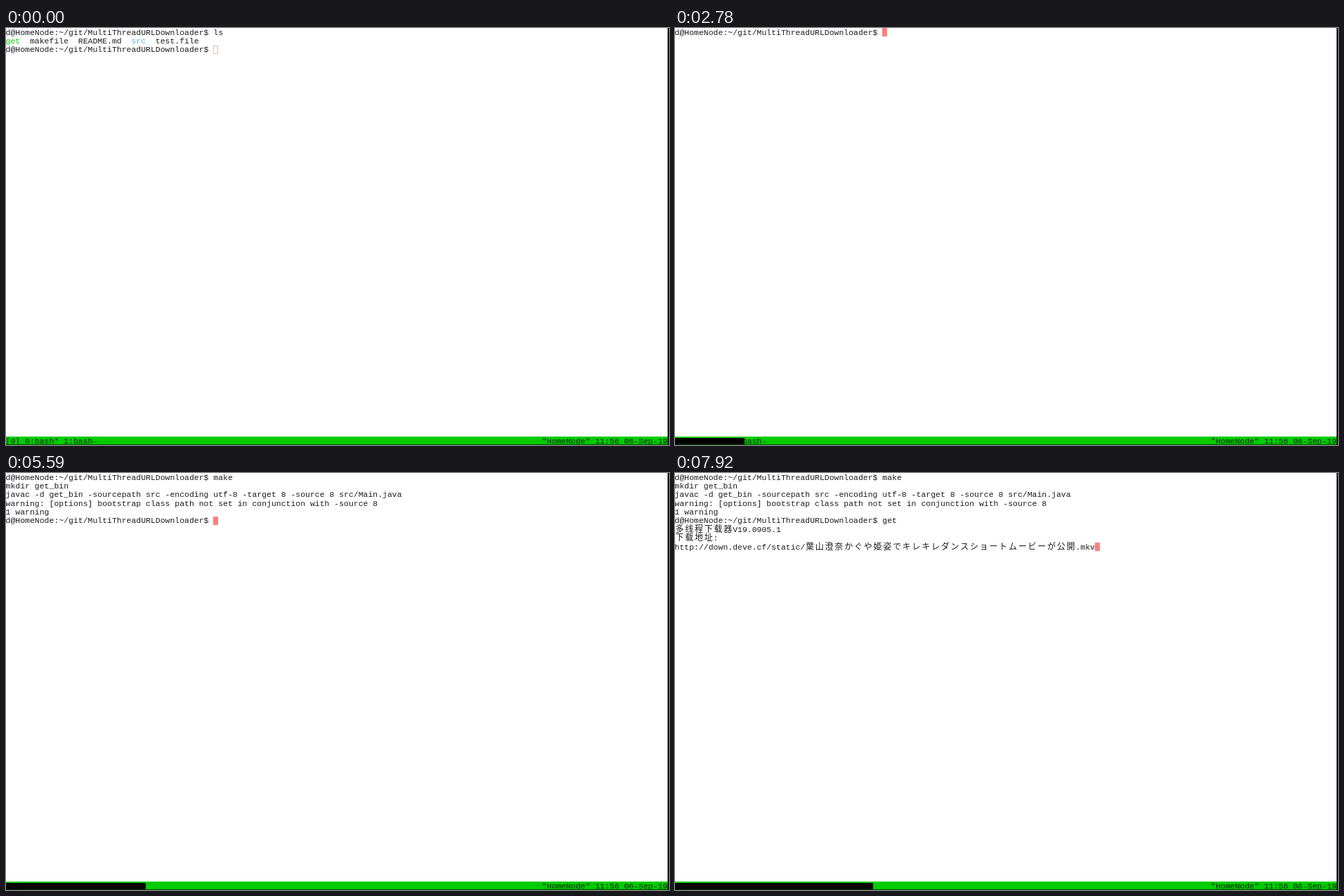
Write an HTML page with a canvas that moves like this. It is 944 px wide and 593 px high and loops after 8 s.

```html
<!DOCTYPE html>
<html lang="en">
<head>
<meta charset="utf-8">
<style>
html, body { margin: 0; width: 100%; height: 100%; overflow: hidden; background: #fff; }
canvas { display: block; }
</style>
</head>
<body>
<canvas id="screen" width="944" height="593"></canvas>
<script>
const g = document.getElementById("screen").getContext("2d");
const LOOP = 8000, CELL = 6.878, ROW = 12.37, BAR_SPEED = 0.0356;
const HOST = "HomeNode";
const PROMPT = `d@${HOST}:~/git/MultiThreadURLDownloader$ `;
const INK = "#1c1c1c", CURSOR = "#ff8080", GREEN = "#00cc00";

// The screen refreshes at uneven moments: [first, last, count].
const steps = [0];
for (const [a, b, n] of [
  [160, 1080, 7], [1210, 1380, 2], [1600, 2170, 5], [2320, 2620, 3], [2780, 3260, 4],
  [3410, 3710, 3], [3860, 4340, 4], [4540, 5420, 7], [5590, 6520, 7], [6670, 7620, 7], [7790, 7920, 2]
]) for (let i = 0; i < n; i++) steps.push(a + (b - a) * i / (n - 1));

// Terminal output: [time, row, text]; "clear" empties the screen first.
const events = [];
const print = (time, row, text) => events.push([time, row, text]);
const type = (row, text, start, gap) => {
  for (let i = 0; i < text.length; i++) print(start + gap * i, row, PROMPT + text.slice(0, i + 1));
};

print(0, 0, PROMPT + "ls");
print(0, 1, "get  makefile  README.md  src  test.file");
print(0, 2, PROMPT);
type(2, "get", 770, 153);
print(1600, 2, PROMPT);
type(2, "clear", 1700, 115);
print(2320, 0, "clear");
print(2320, 0, PROMPT);
type(0, "make", 3410, 150);
print(4540, 1, "mkdir get_bin");
print(4680, 2, "javac -d get_bin -sourcepath src -encoding utf-8 -target 8 -source 8 src/Main.java");
print(5270, 3, "warning: [options] bootstrap class path not set in conjunction with -source 8");
print(5270, 4, "1 warning");
print(5590, 5, PROMPT);
type(5, "get", 5740, 155);
print(6360, 6, "多线程下载器V19.0905.1");
print(6360, 7, "下载地址:");
print(7140, 8, "http://down.deve.cf/static/葉山澄奈かぐや姫姿でキレキレダンスショートムービーが公開.mkv");

const isWide = ch => ch.charCodeAt(0) > 0x2e7f;
const cols = text => [...text].reduce((n, ch) => n + (isWide(ch) ? 2 : 1), 0);
const between = (t, a, b) => t >= a && t < b;

function write(row, col, text, color = INK) {
  const family = row > 7 ? '"Noto Sans CJK JP"' : '"Noto Sans CJK SC"';
  const y = Math.round(row * ROW + 9.6);
  g.fillStyle = color;
  for (const ch of text) {
    const wide = isWide(ch);
    g.font = wide ? `12px ${family}, "Noto Sans CJK", sans-serif`
                  : '11.46px "Liberation Mono", monospace';
    g.fillText(ch, col * CELL + (wide ? 0.4 : -0.4), y);
    col += wide ? 2 : 1;
  }
}

function box(x, y, w, h, color) {
  g.fillStyle = color;
  g.fillRect(x, y, w, h);
}

function drawCursor(row, col, focused) {
  const x = Math.round(col * CELL - 0.8), y = Math.round(row * ROW);
  if (focused) return box(x, y, 7, 12, CURSOR);
  g.strokeStyle = "#e6bfa6";
  g.strokeRect(x + 0.5, y + 0.5, 6, 11);
}

function drawPointer(x, y) {
  box(x, y - 5, 1, 11, "#333");
  for (const end of [-5, 5]) {
    box(x - 2, y + end, 2, 1, "#333");
    box(x + 1, y + end, 2, 1, "#333");
  }
}

function draw(t) {
  let lines = [], last = 0;
  for (const [time, row, text] of events) {
    if (time > t) break;
    if (text === "clear") lines = [];
    else lines[last = row] = text;
  }
  box(0, 0, 944, 593, "#fff");

  if (!between(t, 4340, 5590) && !between(t, 6200, 7140))
    drawCursor(last, cols(lines[last]), t >= 620);
  lines.forEach((text, row) => {
    if (row === 1 && t < 2320) {
      write(row, 0, "get", "#00d000");
      write(row, 5, text.slice(5, 26));
      write(row, 26, "src", "#55b0e8");
      write(row, 31, text.slice(31));
    } else write(row, 0, text);
  });
  if (between(t, 1380, 1600)) box(309, 36, 7, 1, INK);
  if (between(t, 6520, 7140)) drawPointer(t < 6670 ? 563 : 576, 379);

  box(0, 581, 942, 11, GREEN);
  box(0, 592, 942, 1, "#004000");
  write(47, 0, "[0] 0:bash* 1:bash-", "#002000");
  write(47, 111, `"${HOST}" 11:56 06-Sep-19`, "#002000");

  // The progress strip covers the status line from the left.
  const done = Math.round(t * BAR_SPEED);
  box(0, 581, done, 2, GREEN);
  box(0, 583, done, 9, "#000");
  box(942, 0, 2, 593, "#000");
}

function frame() {
  const now = performance.now() % LOOP;
  draw(steps.findLast(s => s <= now + 0.01));
  requestAnimationFrame(frame);
}
frame();
</script>
</body>
</html>
```
